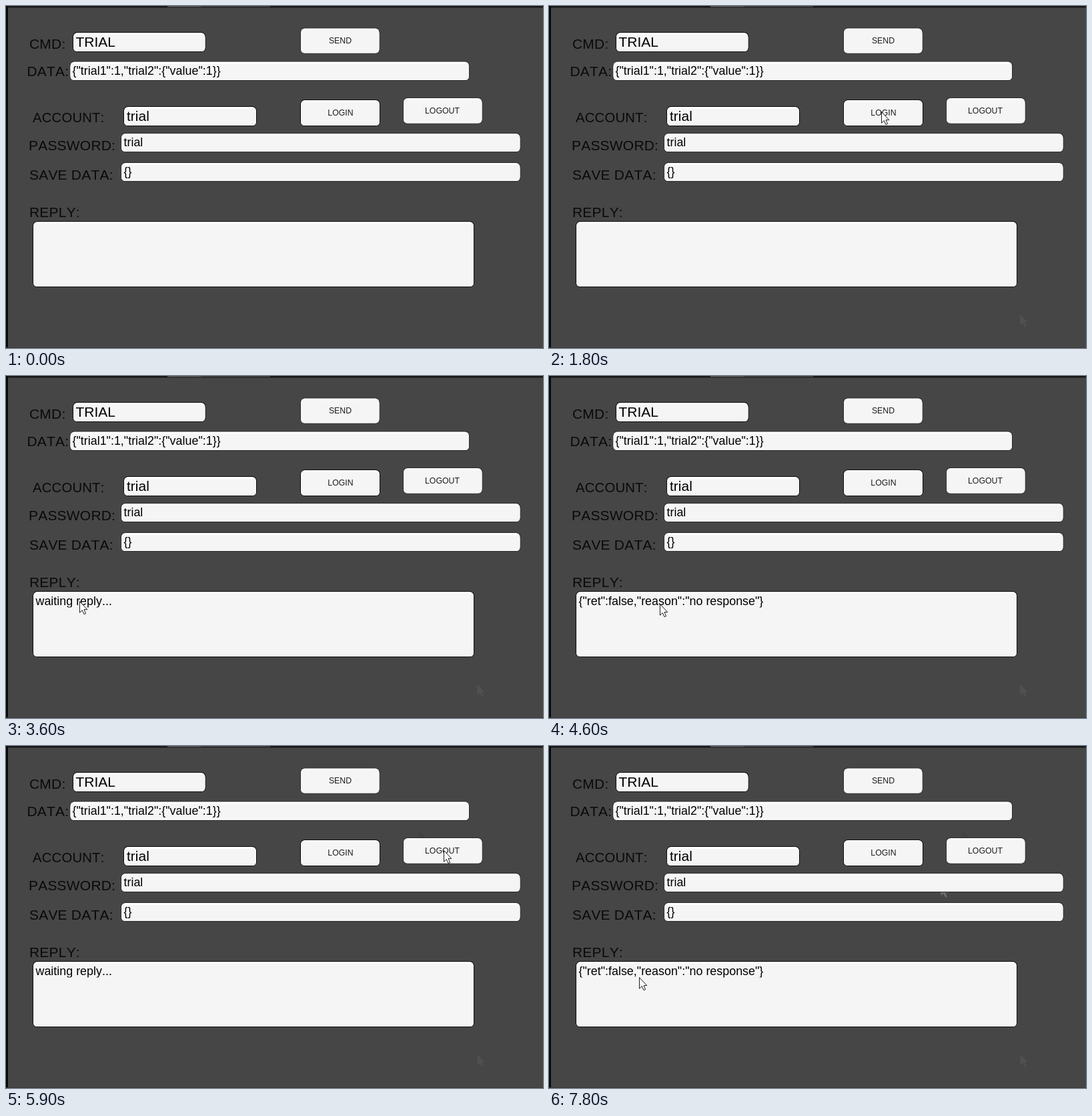
Animation of 805x512 px, one loop 8 s. Source, as an HTML page:

```html
<!DOCTYPE html>
<html lang="en">
<head>
<meta charset="utf-8">
<title>Server reply form</title>
<style>
  html, body { margin: 0; width: 100%; height: 100%; overflow: hidden; background: #464646; }
  svg { display: block; width: 805px; height: 512px; }
  text { font-family: "Liberation Sans", Arial, sans-serif; font-kerning: none; white-space: pre; }
  .label { font-size: 21px; letter-spacing: .2px; fill: #0a0a0a; }
  .big { font-size: 21px; }
  .small { font-size: 17.9px; }
  .caption { font-size: 12.3px; text-anchor: middle; fill: #1c1c1c; }
</style>
</head>
<body>
<svg viewBox="0 0 805 512" xmlns="http://www.w3.org/2000/svg">
  <defs>
    <path id="arrow" d="M.5 .5V17.2L4.3 13.5L7 19.6L9.6 18.5L7 12.6H11.8Z"/>
    <clipPath id="line"><rect x="40" y="324" width="660" height="22.5"/></clipPath>
    <clipPath id="belowField"><rect x="580" y="219" width="30" height="12"/></clipPath>
    <clipPath id="aboveButton"><rect x="610" y="120" width="30" height="17"/></clipPath>
  </defs>
  <rect width="805" height="512" fill="#464646"/>
  <rect width="805" height="2.5" fill="#161616"/>
  <rect x="242" width="50" height="1.5" fill="#5c5c5c"/>
  <rect x="292" width="104" height="1.5" fill="#444"/>
  <rect width="3" height="512" fill="#0a0a0a"/>
  <rect y="511" width="805" height="1" fill="#383838"/>
  <g id="ghosts">
    <use href="#arrow" x="706" y="461" fill="#505050"/>
    <g clip-path="url(#aboveButton)"><use href="#arrow" x="618" y="125" fill="#424245"/></g>
    <g clip-path="url(#belowField)"><use href="#arrow" x="587" y="207" fill="#70707a"/></g>
  </g>
  <g id="form"></g>
  <g clip-path="url(#line)"><text id="reply" class="small" x="44.5" y="343"></text></g>
  <use id="cursor" href="#arrow" fill="#fff" stroke="#1d1d25" stroke-width="1"/>
</svg>
<script>
const LOOP = 8000, STEP = 100;
const $ = id => document.getElementById(id);
const form = $("form");

function add(tag, attrs, text) {
  const el = document.createElementNS("http://www.w3.org/2000/svg", tag);
  for (const key in attrs) el.setAttribute(key, attrs[key]);
  if (text) el.textContent = text;
  form.appendChild(el);
  return el;
}

// Rounded panel with a dark rim and a white upper edge.
function panel(x, y, w, h, rim) {
  add("rect", { x, y, width: w, height: h, rx: 7, fill: rim });
  add("rect", { x: x + 1, y: y + 1, width: w - 2, height: h - 2, rx: 6, fill: "#fff" });
  return add("path", {
    d: `M${x + 1} ${y + 9}q0-5 6-5H${x + w - 7}q6 0 6 5V${y + h - 7}q0 6-6 6H${x + 7}q-6 0-6-6Z`,
    fill: "#f5f5f5"
  });
}

const write = (kind, x, y, text) => add("text", { class: kind, x, y }, text);

const DARK = "#0c0c0c", SOFT = "#2c2c2c";
panel(100, 39, 199.5, 30, DARK);
panel(95.5, 82.5, 599.5, 29.5, SOFT);
panel(176, 150, 200, 30, DARK);
panel(172, 190, 599.5, 29, SOFT);
panel(172, 234, 599.5, 29, SOFT);
panel(40, 322, 662, 99, DARK);
panel(441, 32.5, 119.5, 39, SOFT);
const login = panel(441, 140, 120, 40, DARK);
const logout = panel(595, 137, 119.5, 39.5, SOFT);

write("label", 35, 64, "CMD:");
write("label", 31.5, 105, "DATA:");
write("label", 40, 174, "ACCOUNT:").style.fontSize = "20.3px";
write("label", 34, 216, "PASSWORD:");
write("label", 35, 260, "SAVE DATA:");
write("label", 35, 316, "REPLY:");

write("big", 104.5, 61, "TRIAL");
write("small", 99.5, 103, '{"trial1":1,"trial2":{"value":1}}');
write("big", 181, 172, "trial");
write("small", 176.5, 210, "trial");
write("small", 176.5, 254, "{}");

write("caption", 501, 56, "SEND");
write("caption", 501.5, 164, "LOGIN");
write("caption", 654, 161, "LOGOUT");

// Each move: start time, then one pointer position per step.
const moves = [
  [1100, [706, 461], [668, 340], [612, 215], [565, 145], [530, 121], [510, 138], [501, 152], [498, 158]],
  [2600, [449, 195], [322, 270], [205, 326], [136, 344], [118, 347]],
  [3500, [114, 343], [110, 337], [107, 334], [107, 335]],
  [4600, [166, 341], [196, 354], [270, 346], [405, 285], [548, 205], [602, 142], [618, 125], [642, 138], [652, 146]],
  [5500, [655, 152], [656, 156]],
  [6500, [587, 207], [300, 345], [177, 379], [165, 381], [148, 366], [138, 352], [135, 346]]
];
const replies = [
  [0, ""],
  [2200, "waiting reply..."],
  [4000, '{"ret":false,"reason":"no response"}'],
  [5900, "waiting reply..."],
  [7800, '{"ret":false,"reason":"no response"}']
];
const ghostTimes = [1200, 5300, 6600];

const latest = (list, t) => list.filter(item => item[0] <= t).pop();
const press = (button, t, start) =>
  button.setAttribute("fill", t >= start && t < start + STEP ? "#c8c8c8" : "#f5f5f5");
const show = (el, on) => el.setAttribute("visibility", on ? "visible" : "hidden");

function draw(t) {
  const move = latest(moves, t);
  show($("cursor"), move);
  if (move) {
    const step = Math.min(Math.floor((t - move[0]) / STEP), move.length - 2);
    const [x, y] = move[step + 1];
    $("cursor").setAttribute("transform", `translate(${x} ${y})`);
  }
  $("reply").textContent = latest(replies, t)[1];
  press(login, t, 2100);
  press(logout, t, 5800);
  ghostTimes.forEach((time, i) => show($("ghosts").children[i], t >= time));
}

function tick() {
  draw(performance.now() % LOOP);
  requestAnimationFrame(tick);
}
tick();
</script>
</body>
</html>
```
